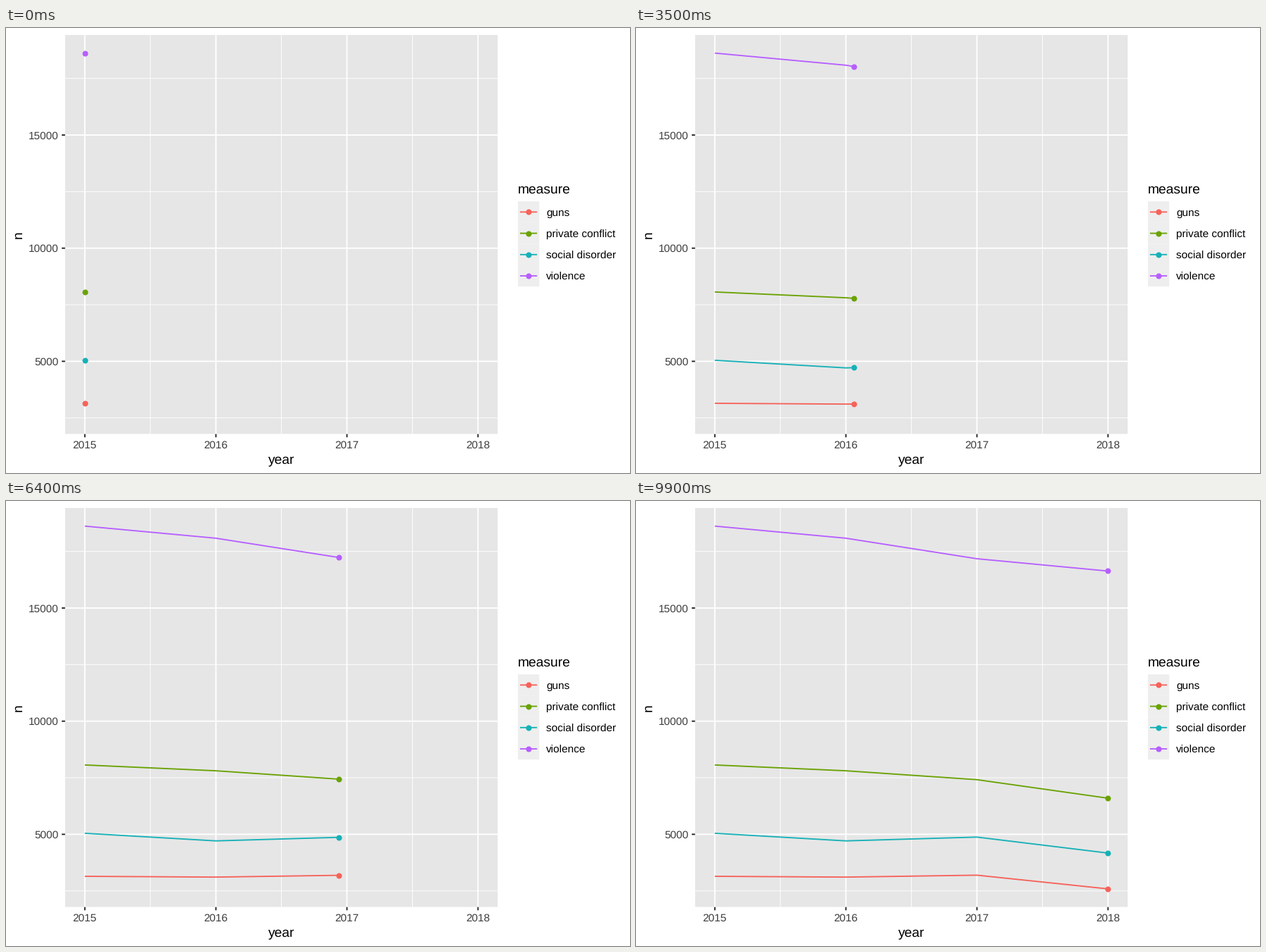
These frames come from a looping animation (885 by 632 pixels, 10000 ms). A matplotlib script:

```python
import matplotlib.pyplot as plt
import numpy as np
from matplotlib.animation import FuncAnimation
from matplotlib.patches import Rectangle

W, H, DPI = 885, 632, 64
FRAMES, INTERVAL = 100, 100
PX = 72 / DPI  # points per pixel

LEFT, RIGHT, TOP, BOTTOM = 83.9, 697.3, 9.9, 576.5
YEARS = np.arange(2015, 2019)
SERIES = {
    "guns": ("#f6625a", [3145, 3110, 3195, 2590]),
    "private conflict": ("#6aa204", [8065, 7808, 7415, 6597]),
    "social disorder": ("#16b1b7", [5046, 4710, 4878, 4172]),
    "violence": ("#b75fff", [18620, 18085, 17178, 16634]),
}

plt.rcParams["font.family"] = "Liberation Sans"
plt.rcParams["text.hinting"] = "no_hinting"


def to_x(year):
    return 111.8 + (np.asarray(year) - 2015) * 185.87


def to_y(n):
    return 312.7 - (np.asarray(n) - 10000) * 0.03214


fig = plt.figure(figsize=(W / DPI, H / DPI), dpi=DPI, facecolor="white")
ax = fig.add_axes([0, 0, 1, 1])
ax.set_xlim(0, W)
ax.set_ylim(H, 0)
ax.axis("off")


def box(x, y, w, h, color):
    ax.add_patch(Rectangle((x, y), w, h, fc=color, lw=0, zorder=0, snap=False))


def line(xs, ys, color, width=1.87, z=1):
    return ax.plot(xs, ys, color=color, lw=width * PX, zorder=z, snap=False,
                   solid_capstyle="butt", solid_joinstyle="round")[0]


def dot(x, y, color):
    return ax.plot([x], [y], "o", color=color, ms=8.1 * PX, mew=0,
                   zorder=4, snap=False)[0]


def label(x, y, text, size=15.4, color="black", ha="left", rotation=0):
    ax.text(x, y, text, fontsize=size * PX, color=color, ha=ha,
            va="baseline", rotation=rotation, rotation_mode="anchor")


def draw_panel():
    box(LEFT, TOP, RIGHT - LEFT, BOTTOM - TOP, "#e6e6e6")
    for n in range(2500, 17501, 5000):
        line([LEFT, RIGHT], [to_y(n)] * 2, "white", 0.93)
    for year in YEARS[:-1] + 0.5:
        line([to_x(year)] * 2, [TOP, BOTTOM], "white", 0.93)
    for n in (5000, 10000, 15000):
        y = to_y(n)
        line([LEFT, RIGHT], [y, y], "white", z=2)
        line([LEFT - 4.8, LEFT], [y, y], "#222222")
        label(75, y + 5.5, str(n), color="#3c3c3c", ha="right")
    for year in YEARS:
        x = to_x(year)
        line([x, x], [TOP, BOTTOM], "white", z=2)
        line([x, x], [BOTTOM, BOTTOM + 4.8], "#222222")
        label(x, 596.6, str(year), color="#3c3c3c", ha="center")
    label(390.6, 619, "year", 19.25, ha="center")
    label(23, 293.3, "n", 19.25, ha="center", rotation=90)


def draw_legend():
    key = 30.24
    label(726, 235, "measure", 19.25)
    for i, (name, (color, _)) in enumerate(SERIES.items()):
        top = 246.2 + i * key
        mid = top + key / 2
        box(726, top, key, key, "#eeeeee")
        line([729, 753.2], [mid, mid], color, z=3)
        dot(741.1, mid, color)
        label(766, mid + 5.6, name)


draw_panel()
draw_legend()
tracks = [(line([], [], color, z=3), dot(0, 0, color), values)
          for color, values in SERIES.values()]


def update(i):
    now = 2015 + 3 * i / (FRAMES - 1)
    past = YEARS < now
    artists = []
    for path, head, values in tracks:
        n = np.interp(now, YEARS, values)
        xs = to_x(np.append(YEARS[past], now))
        ys = to_y(np.append(np.array(values)[past], n))
        path.set_data(xs, ys)
        head.set_data(xs[-1:], ys[-1:])
        artists += [path, head]
    return artists


anim = FuncAnimation(fig, update, frames=FRAMES, interval=INTERVAL,
                     repeat=True, repeat_delay=0)
plt.show()
```
